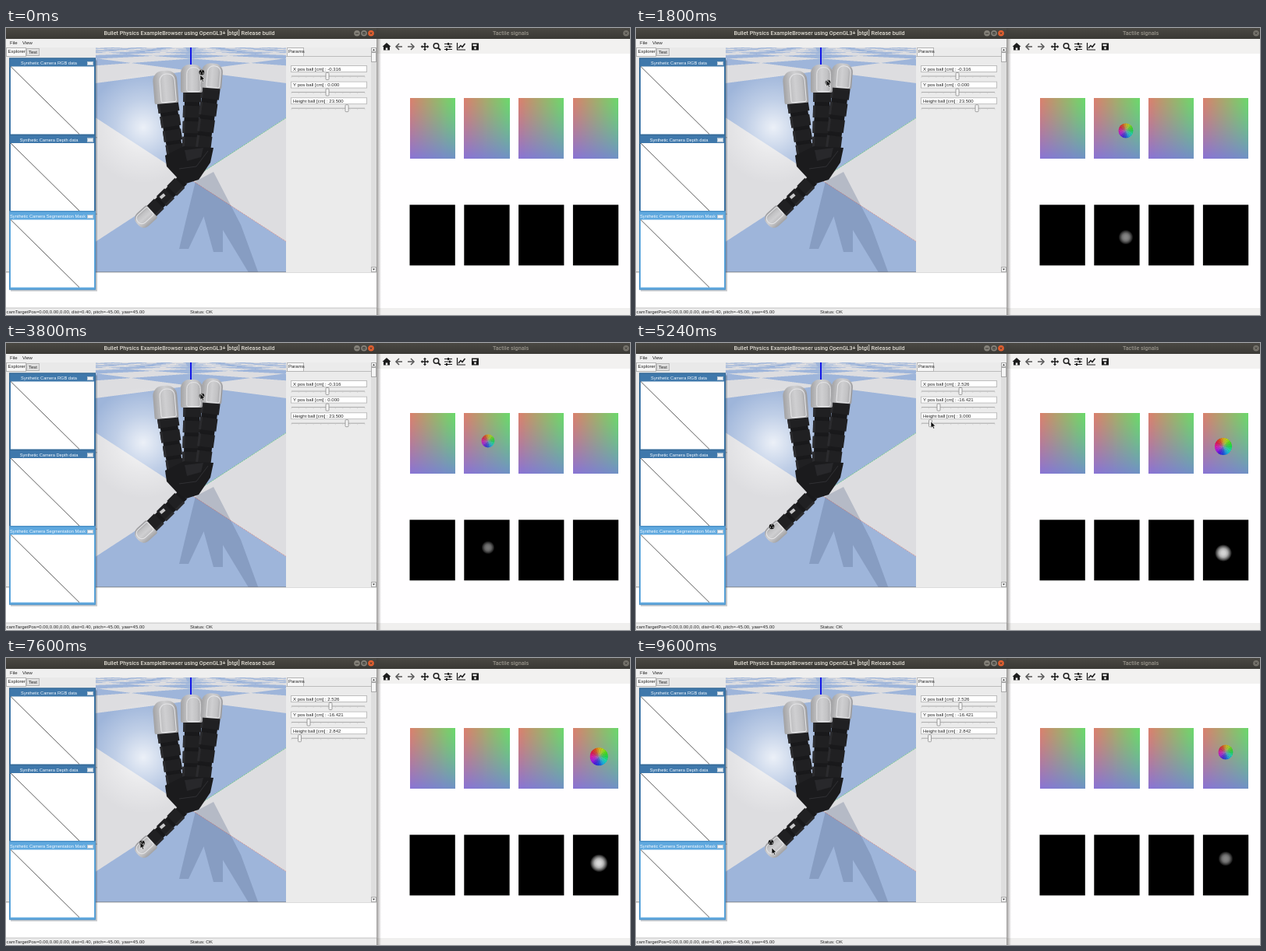
These frames come from a looping animation (800 px wide and 369 px high, 9.64 s). An HTML page with a canvas:

```html
<!DOCTYPE html>
<html lang="en">
<head>
<meta charset="utf-8">
<title>Tactile simulation</title>
<style>
html, body { margin: 0; width: 100%; height: 100%; overflow: hidden; background: #fff; }
canvas { display: block; }
</style>
</head>
<body>
<canvas id="stage" width="800" height="369"></canvas>
<script>
const LOOP = 9640, CUT = 4040, LOWERED = 5560;
const stage = document.getElementById('stage').getContext('2d');
const backdrop = document.createElement('canvas');
backdrop.width = 800;
backdrop.height = 369;
let g = backdrop.getContext('2d');

const UI = '6px "Liberation Sans", Arial, sans-serif';
const SMALL = '5.7px "Liberation Sans", Arial, sans-serif';
const TITLE = '500 7.2px Roboto, sans-serif';
const PAD_W = 58.3, PAD_H = 78, COLOR_Y = 90, DEPTH_Y = 227.3;
const padX = i => 517.5 + i * 69.8;

function box(x, y, w, h, fill, stroke) {
  g.fillStyle = fill;
  g.fillRect(x, y, w, h);
  if (stroke) {
    g.strokeStyle = stroke;
    g.lineWidth = 1;
    g.strokeRect(x + .5, y + .5, w - 1, h - 1);
  }
}

function text(str, x, y, color = '#222', font = UI, align = 'left') {
  g.font = font;
  g.fillStyle = color;
  g.textAlign = align;
  g.fillText(str, x, y);
}

function path(points, close) {
  g.beginPath();
  points.forEach(([x, y]) => g.lineTo(x, y));
  if (close) g.closePath();
}

function poly(color, ...points) {
  path(points, true);
  g.fillStyle = color;
  g.fill();
}

function line(color, width, ...points) {
  path(points);
  g.strokeStyle = color;
  g.lineWidth = width;
  g.stroke();
}

function disc(x, y, r, fill) {
  g.beginPath();
  g.arc(x, y, r, 0, 7);
  g.fillStyle = fill;
  g.fill();
}

function radial(x, y, r, ...colors) {
  const tone = g.createRadialGradient(x, y, 0, x, y, r);
  colors.forEach((c, i) => tone.addColorStop(i / (colors.length - 1), c));
  return tone;
}

function turned(x, y, angle, paint) {
  g.save();
  g.translate(x, y);
  g.rotate(angle);
  paint();
  g.restore();
}

// Builds a small canvas from a colour function of the pixel position.
function shade(w, h, colorAt) {
  const c = document.createElement('canvas');
  c.width = w;
  c.height = h;
  const ctx = c.getContext('2d'), img = ctx.createImageData(w, h);
  for (let p = 0; p < w * h; p++) img.data.set([...colorAt(p % w, Math.floor(p / w)), 255], p * 4);
  ctx.putImageData(img, 0, 0);
  return c;
}

const mix = (a, b, k) => a.map((v, i) => v + (b[i] - v) * k);

// Perspective checkerboard, supersampled because the far tiles are tiny.
function floorColor(px, py) {
  const centerY = 195, scaleY = 175, scaleX = 268, dist = .25;
  let blue = 0;
  for (let i = 0; i < 9; i++) {
    const x = (px + 115 + (i % 3 + .5) / 3 - 237) / scaleX;
    const y = (centerY - 25 - py - (Math.floor(i / 3) + .5) / 3) / scaleY;
    const ahead = dist * y / (1 - y) / 2 * 2, side = x * (dist + ahead);
    if ((Math.floor(ahead + side) + Math.floor(ahead - side)) % 2 === 0) blue++;
  }
  return mix([221, 221, 224], [158, 181, 218], blue / 9);
}

function padColor(x, y) {
  const u = x / 58, v = y / 77;
  const top = mix([218, 128, 110], [108, 216, 108], u);
  const low = mix([138, 116, 212], [112, 146, 196], u);
  return mix(top, low, Math.pow(v, 1.25));
}

function limb(x0, y0, x1, y1, w0, w1, count) {
  const step = Math.hypot(x1 - x0, y1 - y0) / count;
  turned(x0, y0, Math.atan2(y1 - y0, x1 - x0) - Math.PI / 2, () => {
    for (let i = 0; i < count; i++) {
      const w = w0 + (w1 - w0) * i / count, y = i * step;
      box(-w * .42, y - 1, w * .84, step + 2, '#19191b');
      box(-w / 2, y, w, step * .76, '#202022');
      box(-w / 2, y, 3, step * .76, '#2b2b2e');
    }
  });
}

function fingertip(x, y, w, h, angle) {
  turned(x, y, angle, () => {
    const tone = g.createLinearGradient(-w / 2, 0, w / 2, 0);
    ['#a2a2a4', '#bdbdbf', '#cfcfd1', '#c2c2c4', '#9a9a9d'].forEach((c, i) => tone.addColorStop(i / 4, c));
    g.beginPath();
    g.roundRect(-w / 2, -h / 2, w, h, [w * .4, w * .4, 2, 2]);
    g.fillStyle = tone;
    g.fill();
    g.beginPath();
    g.roundRect(-w * .22, -h * .4, w * .62, h * .86, [w * .28, w * .28, 2, 2]);
    g.strokeStyle = '#e6e6e8';
    g.lineWidth = 1;
    g.stroke();
  });
}

function drawShadow() {
  const color = 'rgb(78,94,130)';
  g.save();
  g.globalAlpha = .28;
  g.lineJoin = 'round';
  // One shape, so that the overlaps stay even.
  g.beginPath();
  [[228, 284], [272, 288], [318, 316]].forEach(([x, y]) => {
    g.moveTo(243, 197);
    g.lineTo(266, 185);
    g.lineTo((x + 268) / 2 + 8, (y + 190) / 2);
    g.lineTo(x + 6, y);
    g.lineTo(x - 6, y);
    g.lineTo((x + 250) / 2 - 7, (y + 200) / 2);
    g.closePath();
  });
  g.fillStyle = color;
  g.fill();
  g.restore();
}

function drawScene() {
  g.save();
  g.beginPath();
  g.rect(115, 25, 244, 289);
  g.clip();
  g.drawImage(shade(244, 289, floorColor), 115, 25);
  g.fillStyle = radial(176, 128, 72, 'rgba(255,255,255,.8)', 'rgba(255,255,255,.35)', 'rgba(255,255,255,0)');
  g.fillRect(115, 50, 135, 160);
  drawShadow();

  g.setLineDash([2, 1]);
  line('rgba(40,190,70,.65)', .8, [237, 195], [360, 115]);
  line('rgba(210,70,60,.5)', .8, [237, 195], [360, 275]);
  g.setLineDash([]);
  line('#1418e8', 2, [237, 25], [237, 60]);

  limb(207, 94, 218, 168, 27, 20, 4);
  limb(239, 80, 237, 160, 23, 22, 4);
  limb(263, 75, 252, 160, 24, 18, 4);
  limb(186, 236, 226, 196, 18, 18, 3);
  poly('#1b1b1d', [204, 164], [228, 152], [266, 154], [262, 173], [247, 195], [231, 200], [219, 192], [206, 178]);
  poly('#28282b', [229, 157], [253, 154], [250, 166], [232, 171]);
  line('#37373a', .8, [222, 181], [244, 178], [259, 158]);
  turned(201, 216, -.7, () => box(-4, -2, 7, 4, '#c8c8ca'));
  fingertip(204.5, 76, 31, 42, -.08);
  fingertip(238, 65, 28, 36, 0);
  fingertip(264, 61.5, 27, 32, .08);
  fingertip(178, 244, 22, 25, -2.31);
  g.restore();
}

function cameraWindow(title, index, align = 'center') {
  const y = 38.5 + index * 98.5, active = index === 2;
  box(6, y + 3, 111, 100, 'rgba(60,70,85,.3)');
  box(4, y, 111, 101, active ? '#60a9df' : '#3f78ab', active ? '#4b92c8' : '#346791');
  box(6, y + 11, 107, 87, '#fff');
  g.save();
  g.beginPath();
  g.rect(5, y, 98, 12);
  g.clip();
  text(title, align === 'left' ? 5 : 55, y + 8.6, '#f5faff', SMALL, align);
  g.restore();
  box(104, y + 4.5, 8, 5, '#eef3f8', '#b6c5d2');
  line('#333', .8, [6, y + 11], [94, y + 98]);
}

function titleBar(x, w, title, center, color) {
  const tone = g.createLinearGradient(0, 0, 0, 14);
  tone.addColorStop(0, '#4a4843');
  tone.addColorStop(1, '#3a3935');
  g.fillStyle = tone;
  g.fillRect(x, 0, w, 14);
  text(title, center, 9.3, color, TITLE, 'center');
}

function closeButton(x, fill) {
  disc(x, 6.7, 3.8, fill);
  for (const d of [-1.5, 1.5]) line('#3a3935', .9, [x - d, 5.2], [x + d, 8.2]);
}

function drawToolbar() {
  const ink = '#1c1c1c', y = 24;
  poly(ink, [482.5, y], [488, 19], [493.5, y], [492, y], [492, 28.5], [484, 28.5], [484, y]);
  box(486.8, 25.5, 2.4, 3, '#f2f1f0');
  [[504, -1], [519, 1]].forEach(([x, d]) => {
    line('#555', 1.5, [x - 4 * d, y], [x + 4 * d, y]);
    line('#555', 1.5, [x, 20], [x + 4 * d, y], [x, 28]);
  });
  for (let i = 0; i < 4; i++) {
    turned(537, y, i * Math.PI / 2, () => {
      line(ink, 1.5, [0, 0], [0, -4]);
      poly(ink, [-2, -3], [0, -5.3], [2, -3]);
    });
  }
  disc(551.5, 23, 4, ink);
  disc(551.5, 23, 2.5, '#f2f1f0');
  line(ink, 2, [554, 25.5], [557, 28.5]);
  for (let i = 0; i < 3; i++) {
    line(ink, 1, [562, 20.5 + i * 3.5], [572, 20.5 + i * 3.5]);
    box(564 + (i + 1) % 3 * 2, 19 + i * 3.5, 2, 3, ink);
  }
  line(ink, 1.2, [578.5, 19], [578.5, 28], [589, 28]);
  line(ink, 1.5, [580, 26], [583, 22.5], [585, 24.5], [588.5, 20]);
  box(597, 19.5, 9, 9, ink);
  box(598.5, 21, 5, 2.2, '#f2f1f0');
  disc(601.5, 26, 1.4, '#f2f1f0');
}

function drawLeftWindow() {
  const edge = '#b5b5b5';
  box(0, 14, 475, 23, '#efefef');
  text('File', 5, 21);
  text('View', 21, 21);
  box(0, 25, 115, 289, '#e9e9e9');
  drawScene();
  box(26, 26, 17, 10, '#e0e0e0', edge);
  box(0, 25, 26, 12, '#f7f7f7', edge);
  text('Explorer', 2.5, 32.3);
  text('Test', 29, 32.6);

  box(0, 313.5, 475, 1, '#777');
  box(0, 314.5, 475, 46, '#fff');
  cameraWindow('Synthetic Camera RGB data', 0);
  cameraWindow('Synthetic Camera Depth data', 1);
  cameraWindow('Synthetic Camera Segmentation Mask', 2, 'left');

  box(359, 25, 116, 289, '#ebebeb');
  box(359, 36, 109, 1, '#bcbcbc');
  box(360, 25, 22, 12, '#f7f7f7', edge);
  text('Params', 362, 32.3);
  box(468, 25, 7, 289, '#dedede');
  [[25, 6], [31, 13], [307, 7]].forEach(([y, h]) => box(468, y, 7, h, '#f5f5f5', '#aaa'));
  poly('#333', [470, 29], [471.5, 27], [473, 29]);
  poly('#333', [470, 309.5], [473, 309.5], [471.5, 311.5]);

  box(0, 360, 475, 9, '#ececec');
  box(0, 359.5, 475, 1, '#c4c4c4');
  text('camTargetPos=0.00,0.00,0.00, dist=0.40, pitch=-45.00, yaw=45.00', .5, 366.5);
  text('Status: OK', 236, 366.5);
  titleBar(0, 475, 'Bullet Physics ExampleBrowser using OpenGL3+ [btgl] Release build', 235, '#dfdbd2');
  disc(450, 6.7, 3.8, '#85827a');
  line('#3a3935', 1, [448, 7], [452, 7]);
  disc(459, 6.7, 3.8, '#85827a');
  box(457.3, 5, 3.4, 3.4, '#85827a', '#3a3935');
  closeButton(468, '#e8602f');
}

function drawRightWindow() {
  box(475, 14, 325, 19, '#f2f1f0');
  box(475, 33, 325, 327, '#fffeff');
  box(475, 360, 325, 9, '#f0efee');
  titleBar(475, 325, 'Tactile signals', 647, '#98948b');
  closeButton(795, '#77746d');
  const fade = g.createLinearGradient(475, 0, 481, 0);
  fade.addColorStop(0, 'rgba(60,58,55,.5)');
  fade.addColorStop(1, 'rgba(60,58,55,0)');
  g.fillStyle = fade;
  g.fillRect(475, 0, 6, 369);
  drawToolbar();
  const pad = shade(59, 78, padColor);
  for (let i = 0; i < 4; i++) {
    g.drawImage(pad, padX(i), COLOR_Y, PAD_W, PAD_H);
    box(padX(i), DEPTH_Y, PAD_W, PAD_H, '#000');
  }
}

function slider(label, y, knob) {
  box(365, y, 98, 9, '#fff', '#bdbdbd');
  text(label, 368, y + 6.5);
  line('#a9a9a9', 1, [366, y + 14], [460, y + 14]);
  for (let x = 366; x <= 460; x += 9.4) line('#c4c4c4', .5, [x, y + 14], [x, y + 16]);
  g.beginPath();
  g.roundRect(knob - 2, y + 9.5, 4, 9, 1);
  g.fillStyle = '#f4f4f4';
  g.fill();
  g.strokeStyle = '#8c8c8c';
  g.lineWidth = .8;
  g.stroke();
}

function drawBall(x, y) {
  disc(x, y, 3.3, '#111');
  for (let a = .5; a < 6; a += 2.1) disc(x + 2 * Math.cos(a), y + 2 * Math.sin(a), .75, '#e6e6e6');
}

function drawCursor(x, y) {
  g.save();
  g.translate(x, y);
  path([[0, 0], [0, 8.2], [2, 6.5], [3.3, 9.3], [4.7, 8.6], [3.5, 5.9], [6, 5.7]], true);
  g.fillStyle = '#111';
  g.fill();
  g.strokeStyle = '#fff';
  g.lineWidth = .6;
  g.stroke();
  g.restore();
}

// Contact spot: surface normals as hues above, indentation depth below.
function drawSpot(x, y, r, level) {
  if (level <= 0) return;
  g.save();
  g.globalAlpha = Math.min(1, level * 2);
  const hues = g.createConicGradient(0, x, y);
  for (let i = 0; i <= 12; i++) hues.addColorStop(i / 12, `hsl(${135 + i * 30},${60 + level * 30}%,47%)`);
  disc(x, y, r, hues);
  disc(x, y, r, radial(x, y, r, 'rgba(140,150,165,.85)', 'rgba(140,150,165,.25)', 'rgba(140,150,165,0)'));
  for (let ring = 2; ring < r; ring += 2.2) {
    const n = Math.round(ring * 2.2);
    for (let i = 0; i < n; i++) {
      const a = i / n * Math.PI * 2 + ring;
      disc(x + ring * Math.cos(a), y + ring * Math.sin(a), .45, 'rgba(40,40,70,.35)');
    }
  }
  g.restore();
  const v = Math.round(level * 255), gray = a => `rgba(${v},${v},${v},${a})`;
  disc(x, y + 137, r, radial(x, y + 137, r, gray(1), gray(.97), gray(.82), gray(.45), gray(0)));
}

function ramp(t, from, to) {
  const k = Math.min(1, Math.max(0, (t - from) / (to - from)));
  return k * k * (3 - 2 * k);
}

// The ball is pressed on the middle finger and rolled there and back.
function fingerPose(t) {
  const press = ramp(t, 400, 900), roll = Math.cos((t - 1800) / 2000 * Math.PI);
  const x = 246.5 - 2.5 * roll, y = 61 + 5 * press + roll;
  return {
    sliders: [['-0.316', 412], ['0.000', 412], ['23.500', 437]],
    spot: [623 + 5 * roll, 129 + 3 * roll, 9 + roll / 2, press * (.5 + .03 * roll)],
    ball: [x + 2, y - 3 + 6 * press],
    cursor: [x, y]
  };
}

// The ball is lowered onto the thumb by slider, then dragged aside and back.
function thumbPose(t) {
  const deep = ramp(t, LOWERED - 200, LOWERED), reach = ramp(t, 5700, 6500);
  const slide = ramp(t, 6800, 8440), back = ramp(t, 8440, 9600);
  const height = t < LOWERED ? ['3.000', 377.5] : ['2.842', 376.5];
  return {
    sliders: [['2.526', 416], ['-16.421', 388], height],
    spot: [753 + 15 * slide - 12 * back, 133 + deep - 15 * slide + 2 * back,
      11 + 1.5 * deep - 2 * slide - back, .84 + .16 * deep - .3 * slide - .18 * back],
    ball: [174 + slide - 2 * back, 236 + 4 * slide - 3 * back],
    cursor: [378 - 204 * reach - 4 * slide + 4 * back, 101 + 132 * reach + 8 * slide + 3 * back]
  };
}

function draw(t) {
  const pose = t < CUT ? fingerPose(t) : thumbPose(t);
  g.drawImage(backdrop, 0, 0);
  ['X pos', 'Y pos', 'Height'].forEach((name, i) => {
    const [value, knob] = pose.sliders[i];
    slider(`${name} ball [cm] : ${value}`, 48 + i * 20.6, knob);
  });
  drawSpot(...pose.spot);
  drawBall(...pose.ball);
  drawCursor(...pose.cursor);
}

box(0, 0, 800, 369, '#fff');
drawLeftWindow();
drawRightWindow();
g = stage;
function tick() {
  draw(performance.now() % LOOP);
  requestAnimationFrame(tick);
}
tick();
</script>
</body>
</html>
```
